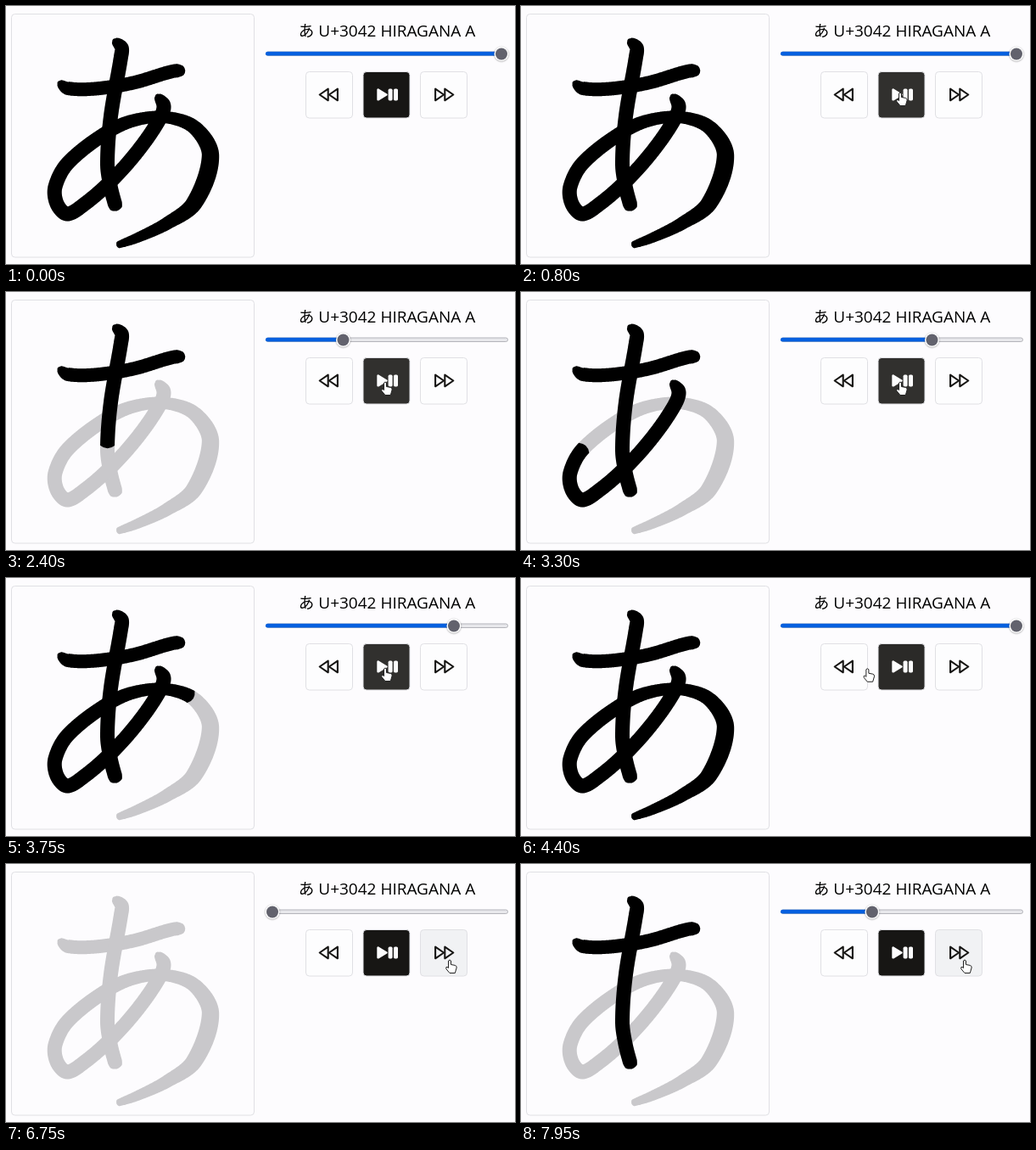
Recreate the animation shown at these times as an HTML page with a canvas. Size 600 px wide and 304 px high, loop 8000 ms.

```html
<!DOCTYPE html>
<html lang="en">
<head>
<meta charset="utf-8">
<title>Stroke order player</title>
<style>
  html, body { margin: 0; width: 100%; height: 100%; overflow: hidden; background: #fdfcfe; }
  canvas { display: block; }
</style>
</head>
<body>
<canvas id="stage" width="600" height="304"></canvas>
<script>
const ctx = document.getElementById('stage').getContext('2d');
const LOOP = 8000;
const INK = '#171614', EDGE = '#e0e0e4';

// Smooth open curve through points, tangents scaled by chord length.
function spline(text) {
  const p = text.split(' ').map(s => s.split(',').map(Number));
  const at = i => p[Math.max(0, Math.min(p.length - 1, i))];
  const dist = (a, b) => Math.hypot(b[0] - a[0], b[1] - a[1]);
  const dir = i => {
    const a = at(i - 1), b = at(i), c = at(i + 1), d = dist(a, b) + dist(b, c);
    return [(c[0] - a[0]) / d, (c[1] - a[1]) / d];
  };
  let d = 'M' + p[0];
  for (let i = 0; i < p.length - 1; i++) {
    const a = at(i), b = at(i + 1), k = dist(a, b) / 3, u = dir(i), v = dir(i + 1);
    d += `C${a[0] + u[0] * k},${a[1] + u[1] * k} ${b[0] - v[0] * k},${b[1] - v[1] * k} ${b}`;
  }
  return d;
}

const bell = (u, mid, spread) => Math.exp(-(((u - mid) / spread) ** 2));
const taper = (d, length, tip) => tip + (1 - tip) * Math.sqrt(Math.min(1, d / length));

// A brush stroke: centre line sampled every pixel, with its two edges.
function makeStroke(from, to, points, width, tailLength, tailTip) {
  const line = document.createElementNS('http://www.w3.org/2000/svg', 'path');
  line.setAttribute('d', spline(points));
  const length = line.getTotalLength();
  const ribs = [];
  for (let s = 0; s <= length; s++) {
    const p = line.getPointAtLength(s);
    const a = line.getPointAtLength(Math.max(0, s - 1.5)), b = line.getPointAtLength(s + 1.5);
    const d = Math.hypot(b.x - a.x, b.y - a.y);
    const half = width(s / length) / 2 * taper(s, 13, 0.3) * taper(length - s, tailLength, tailTip);
    const tx = (b.x - a.x) / d * half, ty = (b.y - a.y) / d * half;
    ribs.push({ x: p.x, y: p.y, tx, ty });
  }
  return { from, to, ribs };
}

const END1 = 0.161, END2 = 0.37;
const strokes = [
  makeStroke(0, END1, '62,90 73,97 105,97.5 150,90.5 196,77 210,76', () => 16, 8, 0.5),
  makeStroke(END1, END2, '127,40 136,49 135.5,60 123.5,130 119.5,185 123,212 130,239', () => 17, 6, 0.75),
  makeStroke(END2, 1,
    '178,105 186,119 177,140 152,175 123,207 93,233 72,245 60,233 58,213 73,185 ' +
    '118,149.5 150,135 188,131 222,143 241,176 222,232 190,256 155,273 131,282',
    u => 17 - 3 * bell(u, 0.61, 0.08) + 4 * bell(u, 0.77, 0.09), 105, 0.4)
];

function paintStroke(stroke, k) {
  const ribs = stroke.ribs.slice(0, Math.ceil(stroke.ribs.length * k));
  if (ribs.length < 2) return;
  const first = ribs[0], last = ribs[ribs.length - 1];
  ctx.beginPath();
  for (const r of ribs) ctx.lineTo(r.x - r.ty, r.y + r.tx);
  ctx.quadraticCurveTo(last.x + last.tx * 0.8, last.y + last.ty * 0.8, last.x + last.ty, last.y - last.tx);
  for (const r of ribs.reverse()) ctx.lineTo(r.x + r.ty, r.y - r.tx);
  ctx.quadraticCurveTo(first.x - first.tx, first.y - first.ty, first.x - first.ty, first.y + first.tx);
  ctx.fill();
}

function drawGlyph(value) {
  ctx.fillStyle = '#c9c8cb';
  for (const s of strokes) paintStroke(s, 1);
  ctx.fillStyle = '#000';
  for (const s of strokes) paintStroke(s, Math.max(0, Math.min(1, (value - s.from) / (s.to - s.from))));
}

// Slider position: full, played through, then stepped back and forward.
function progress(t) {
  if (t < 1537) return 1;
  if (t < 4850) return Math.min(1, (t - 1537) / 2794);
  if (t < 5350) return END2;
  if (t < 6050) return END1;
  if (t < 7150) return 0;
  return t < 7800 ? END1 : END2;
}

const moves = [
  { start: 350, end: 750, x: 447, y: 102 },
  { start: 850, end: 1300, x: 447, y: 106 },
  { start: 4305, end: 4560, x: 396, y: 107 },
  { start: 6250, end: 6700, x: 523, y: 113 }
];
function pointer(t) {
  let x = 468, y = -18;
  for (const m of moves) {
    const u = Math.max(0, Math.min(1, (t - m.start) / (m.end - m.start)));
    const k = 1 - (1 - u) ** 3;
    x += (m.x - x) * k;
    y += (m.y - y) * k;
  }
  return [x, y];
}

const light = { idle: [253, 253, 254], hover: [241, 242, 244] };
const dark = { idle: [23, 22, 20], hover: [49, 48, 46] };
const buttons = [light, dark, light].map((look, i) => ({ x: 353.5 + 67.5 * i, ...look }));
const over = (b, [x, y]) => x >= b.x && x < b.x + 55 && y >= 77 && y < 132;

// Hover colour fades over 150 ms.
function hoverAmount(b, t) {
  let k = 0;
  for (let i = 0; i < 10; i++) k += over(b, pointer(t - i * 15)) / 10;
  return k * k * (3 - 2 * k);
}

function box(x, y, w, h, r, fill, edge) {
  ctx.beginPath();
  ctx.roundRect(x, y, w, h, r);
  if (fill) { ctx.fillStyle = fill; ctx.fill(); }
  if (edge) { ctx.strokeStyle = edge; ctx.lineWidth = 1; ctx.stroke(); }
}

function drawTitle() {
  ctx.fillStyle = '#000';
  ctx.font = '500 18.5px "Noto Sans CJK JP", "Noto Sans CJK", sans-serif';
  ctx.fillText('あ', 344.8, 36.3);
  ctx.font = '19px "Open Sans", "Noto Sans", sans-serif';
  ctx.fillText('U+3042 HIRAGANA A', 368.3, 36.3);
}

function drawSlider(value, hot) {
  const x = 314 + 270 * value, y = 56.5;
  box(306.5, 54, 285, 4.5, 2.2, hot ? '#d4d4da' : '#e8e8ec', hot ? '#909096' : '#b4b4ba');
  box(306, 53.8, x - 306, 4.8, 2.4, hot ? '#0250bb' : '#0560df');
  ctx.save();
  ctx.shadowColor = 'rgba(0,0,0,.4)';
  ctx.shadowBlur = 2;
  ctx.shadowOffsetY = 0.5;
  box(x - 8.5, y - 8.5, 17, 17, 8.5, '#fff');
  ctx.restore();
  box(x - 7, y - 7, 14, 14, 7, hot ? '#52525e' : '#62626d');
}

function triangle(tip, base, halfHeight, lineWidth) {
  ctx.lineWidth = lineWidth;
  ctx.lineJoin = 'round';
  ctx.beginPath();
  ctx.moveTo(tip, 104.5);
  ctx.lineTo(base, 104.5 - halfHeight);
  ctx.lineTo(base, 104.5 + halfHeight);
  ctx.closePath();
  ctx.stroke();
}

function skipIcon(x, sign) {
  ctx.strokeStyle = INK;
  for (const tip of [-10.8, 0.4]) triangle(x + sign * tip, x + sign * (tip + 10), 6.8, 2.1);
}

function playPauseIcon() {
  ctx.fillStyle = ctx.strokeStyle = '#fdfdfe';
  triangle(448.4, 438.6, 5.8, 2.6);
  ctx.fill();
  for (const x of [450.6, 457]) box(x, 97.6, 5, 13.8, 1.6, '#fdfdfe');
}

const hand = new Path2D('M-1.5 1Q0 -1 1.5 1V5.5L6.3 6.4Q8.2 6.8 8.2 9L6.3 15.5H0L-4 10.8Q-5 8 -3 8.3L-1.5 9.6Z');
const arrow = new Path2D('M0 0V10L2.2 7.9L3.8 11.4L5.4 10.7L4 7.3H7Z');

function drawPointer([x, y], pointing) {
  ctx.save();
  ctx.translate(x, y);
  ctx.fillStyle = '#fff';
  ctx.strokeStyle = pointing ? '#222' : '#555';
  ctx.lineWidth = pointing ? 1 : 0.9;
  const shape = pointing ? hand : arrow;
  ctx.fill(shape);
  ctx.stroke(shape);
  ctx.restore();
}

function draw(t) {
  const pos = pointer(t);
  ctx.fillStyle = '#fdfcfe';
  ctx.fillRect(0, 0, 600, 304);
  box(6.5, 9.5, 286, 286.5, 4, null, EDGE);
  drawGlyph(progress(t));
  drawTitle();
  drawSlider(progress(t), pos[1] > 48 && pos[1] < 65);
  for (const b of buttons) {
    const k = hoverAmount(b, t);
    const rgb = b.idle.map((c, i) => Math.round(c + (b.hover[i] - c) * k));
    box(b.x, 77.5, 55, 54.5, 4, `rgb(${rgb})`, EDGE);
  }
  skipIcon(380.5, 1);
  playPauseIcon();
  skipIcon(516.5, -1);
  drawPointer(pos, buttons.some(b => over(b, pos)));
}

const start = performance.now();
function tick() {
  draw((performance.now() - start) % LOOP);
  requestAnimationFrame(tick);
}
tick();
</script>
</body>
</html>
```
